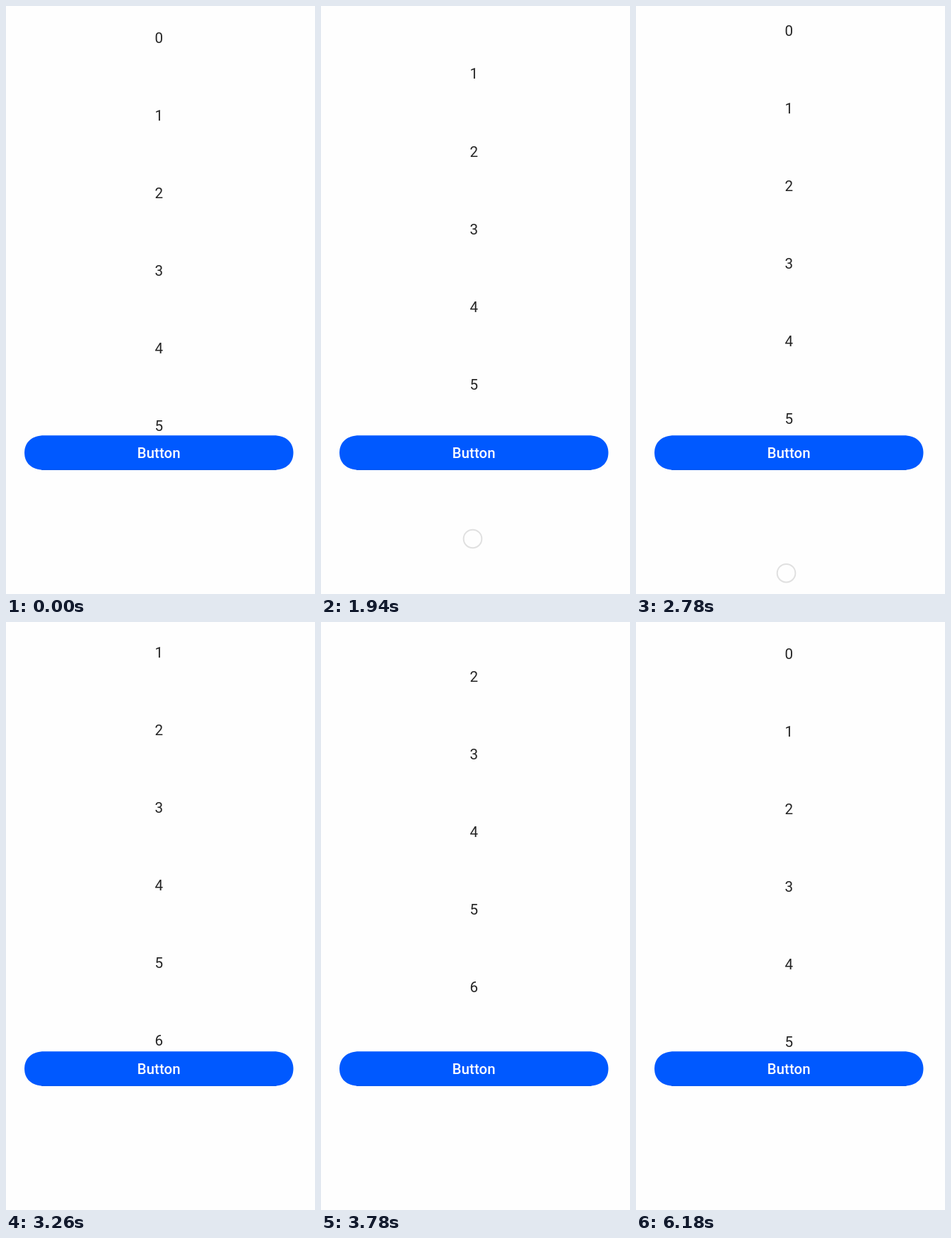
These frames come from a looping animation (435 by 826 pixels, 6.38 s). An HTML page:

```html
<!DOCTYPE html>
<html lang="en">
<head>
<meta charset="utf-8">
<title>Scrolling list</title>
<style>
  html, body { margin: 0; width: 100%; height: 100%; overflow: hidden; background: #fefefe; }
  svg { display: block; width: 100%; height: 100%; }
  text { font-family: Roboto, "Noto Sans", sans-serif; text-anchor: middle; }
  #list { font-size: 20.6px; fill: #242424; }
  #label { font-size: 20.3px; font-weight: 500; fill: #fff; letter-spacing: .15px; }
</style>
</head>
<body>
<svg viewBox="0 0 435 826">
  <defs>
    <clipPath id="view"><rect width="435" height="627"/></clipPath>
  </defs>
  <g id="page">
    <rect width="435" height="826" fill="#fefefe"/>
    <g clip-path="url(#view)"><g id="list"></g></g>
    <path fill="#0059ff" d="M54 603.2H376.5C394.5 603.2 404.5 613 404.5 627.5S394.5 651.8 376.5 651.8H54C36 651.8 26 642 26 627.5S36 603.2 54 603.2Z"/>
    <path stroke="#0050ea" d="M50 651.3H380.5"/>
    <text id="label" x="215.2" y="634.8">Button</text>
    <circle id="touch" r="12.8" fill="none" stroke="#e0e0e0" stroke-width="2"/>
  </g>
  <g id="dark">
    <rect width="435" height="826" fill="#1b1f31"/>
    <path fill="#1b212b" d="M0 0H435V185L375 212 355 237 300 240 240 265 200 292 183 325 178 345 160 375 150 400V465L135 510 115 555 90 615 65 655 30 690 0 715Z"/>
    <path fill="#1e2026" d="M0 0H315L258 38 180 85 90 145 40 185 0 220Z"/>
  </g>
</svg>
<script>
const LOOP = 6380, STEP = 40, ROW = 109.05, SLOP_Y = 806.5;
const RELEASE = 3260, FLING = 3300, STOP = 3780;
const [page, list, touch, dark] = ["page", "list", "touch", "dark"].map(id => document.getElementById(id));

for (let i = 0; i < 8; i++) {
  const row = document.createElementNS("http://www.w3.org/2000/svg", "text");
  row.setAttribute("x", 215.2);
  row.setAttribute("y", 51.5 + i * ROW);
  row.textContent = i;
  list.append(row);
}

const linear = u => u;
const smooth = u => (1 - Math.cos(Math.PI * u)) / 2;
const pull = u => u ** 1.32;

// Finger strokes: start, end, from [x, y], to [x, y], easing of y
const strokes = [
  [1620, 2180, [215, 812], [212.4, 708], smooth],
  [2200, 2860, [213.4, 708], [211.3, 800], smooth],
  [2940, RELEASE, [211, 800], [210.2, 696], pull],
];

function finger(t) {
  const [start, end, from, to, ease] = strokes.findLast(s => t >= s[0]) || strokes[0];
  const u = Math.min(1, Math.max(0, (t - start) / (end - start)));
  const mix = (k, f) => from[k] + (to[k] - from[k]) * f(u);
  return [mix(0, linear), mix(1, ease)];
}

function scrollAt(t, y) {
  if (t < FLING) return Math.max(0, SLOP_Y - y);
  const run = Math.min(t, STOP) - FLING;
  return 192 - 81.5 * Math.exp(-run / 190);
}

function render(time) {
  const t = time % LOOP;
  const tick = Math.floor((t - 20) / STEP) * STEP + 20;
  const isDark = t >= 5810 && t < 6180;
  const [x, y] = finger(tick);
  const scroll = t >= 6180 ? 0 : scrollAt(tick, y);
  page.style.display = isDark ? "none" : "";
  dark.style.display = isDark ? "" : "none";
  list.setAttribute("transform", `translate(0 ${-scroll})`);
  touch.setAttribute("cx", x);
  touch.setAttribute("cy", y);
  touch.style.display = tick >= 1620 && tick < RELEASE ? "" : "none";
}

const origin = performance.now();
function loop() {
  render(performance.now() - origin);
  requestAnimationFrame(loop);
}
loop();
</script>
</body>
</html>
```
